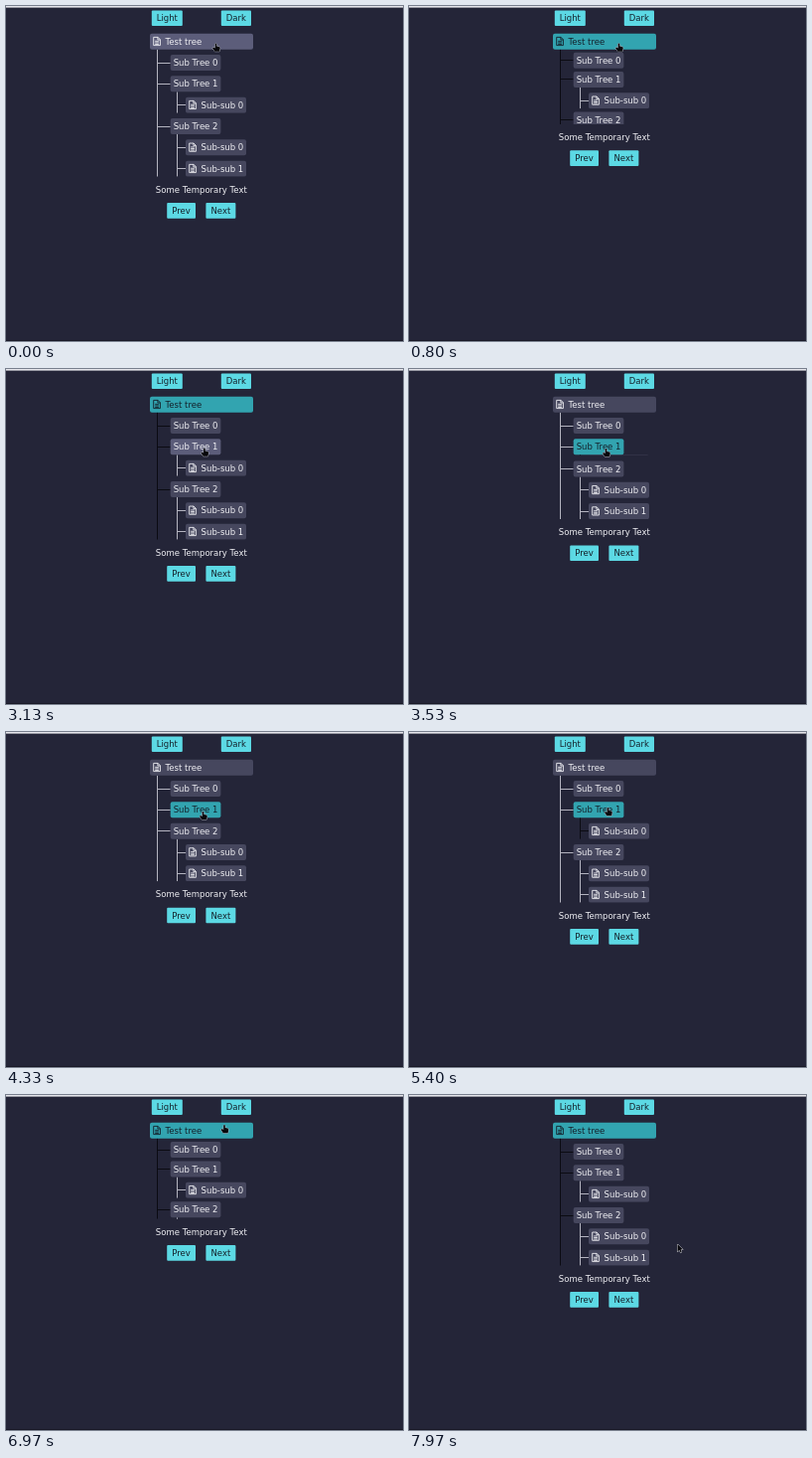
Write an HTML page with a canvas that moves like this. It is 400x337 px and loops after 8 s.

```html
<!DOCTYPE html>
<html lang="en">
<head>
<meta charset="utf-8">
<title>Collapsible tree</title>
<style>
  html, body { margin: 0; width: 100%; height: 100%; overflow: hidden; background: #242538; }
  canvas { display: block; }
</style>
</head>
<body>
<canvas id="stage" width="400" height="337"></canvas>
<script>
const ctx = document.getElementById('stage').getContext('2d');
const LOOP = 8000, SLIDE = 250;
const ROW = 16, GAP = 5.33, TOP = 27.7;
const COLOR = {
  bg: '#242538', node: '#46475e', hover: '#5c5d7a', active: '#32a4b0',
  button: '#5cd9e4', light: '#f0f0f4', dark: '#14202a', line: '#b4b4c0', activeLine: '#0b0b12'
};

const leaf = label => ({ label, icon: true, x: 181, w: 61, kids: [], toggles: [] });
const branch = (label, kids = [], toggles = []) => ({ label, x: 165.7, w: 50.7, kids, toggles });
const tree = {
  label: 'Test tree', icon: true, x: 145, w: 104, toggles: [615, 1900, 6122, 6900],
  kids: [
    branch('Sub Tree 0'),
    branch('Sub Tree 1', [leaf('Sub-sub 0')], [3284, 4450]),
    branch('Sub Tree 2', [leaf('Sub-sub 0'), leaf('Sub-sub 1')])
  ]
};
const clicks = [tree, tree.kids[1]]
  .flatMap(node => node.toggles.map(time => ({ node, time })))
  .sort((a, b) => a.time - b.time);

// time, x, y of the pointer tip
const pointerPath = [
  [0, 211.5, 37.5], [2550, 211.5, 37.5], [3050, 200, 79.5], [3500, 198.5, 80], [4300, 198.5, 80],
  [4700, 200.5, 76], [5420, 200.5, 76], [5780, 260, 60], [6080, 220, 30], [6980, 220, 30],
  [7330, 284, 112], [7650, 270.5, 150], [LOOP, 270.5, 150]
];

function pointerAt(t) {
  const i = pointerPath.findIndex(key => key[0] > t);
  const [t0, x0, y0] = pointerPath[i - 1], [t1, x1, y1] = pointerPath[i];
  const u = (t - t0) / (t1 - t0), k = u * u * (3 - 2 * u);
  return { x: x0 + (x1 - x0) * k, y: y0 + (y1 - y0) * k };
}

// 1 = open, 0 = closed; each toggle slides with a cubic ease-out of the open amount
function openness(node, t) {
  const done = node.toggles.filter(time => time <= t);
  if (!done.length) return 1;
  const u = Math.min(1, (t - done[done.length - 1]) / SLIDE);
  const amount = done.length % 2 ? 1 - u : u;
  return 1 - (1 - amount) ** 3;
}

function box(x, y, w, h, fill, radius = 2) {
  ctx.fillStyle = fill;
  ctx.beginPath();
  ctx.roundRect(x, y, w, h, radius);
  ctx.fill();
}

function text(label, x, middle, fill, align = 'left') {
  ctx.font = '8.53px "DejaVu Sans", sans-serif';
  ctx.textAlign = align;
  ctx.fillStyle = fill;
  ctx.fillText(label, x, middle + 3.1);
}

function button(label, x, middle, w) {
  box(x, middle - 7.8, w, 15.6, COLOR.button, 1);
  text(label, x + w / 2, middle, COLOR.dark, 'center');
}

function fileIcon(x, y, color) {
  ctx.strokeStyle = color;
  ctx.lineWidth = 0.9;
  ctx.stroke(new Path2D(`M${x + .5} ${y + .5}h4.4l2.3 2.4v5.8h-6.7zm4.2 0v2.6h2.5m-5.2 1.3h3.7m-3.7 1.6h3.7m-3.7 1.5h3.7`));
}

const nodeHeight = (node, t) => ROW + openness(node, t) * kidsHeight(node, t);
const kidsHeight = (node, t) => node.kids.reduce((sum, kid) => sum + GAP + nodeHeight(kid, t), 0);

function drawNode(node, y, state) {
  const { t, pointer, active } = state;
  const hovered = pointer.x >= node.x && pointer.x <= node.x + node.w && pointer.y >= y && pointer.y <= y + ROW;
  const isActive = node === active;
  const ink = isActive ? COLOR.dark : COLOR.light;
  if (hovered) state.hand = true;
  box(node.x, y, node.w, ROW, isActive ? COLOR.active : hovered ? COLOR.hover : COLOR.node);
  if (node.icon) fileIcon(node.x + 3.2, y + 3.2, ink);
  text(node.label, node.x + (node.icon ? 15.6 : 3), y + ROW / 2, ink);

  const open = openness(node, t);
  if (!node.kids.length || !open) return;
  const top = y + ROW, height = open * kidsHeight(node, t);
  const lineX = node === tree ? 152.5 : 172;
  const lineColor = isActive ? COLOR.activeLine : COLOR.line;
  ctx.save();
  ctx.beginPath();
  ctx.rect(0, top, 400, height);
  ctx.clip();
  ctx.fillStyle = lineColor;
  ctx.fillRect(Math.round(lineX - .1), top, 1, height);
  let kidY = top;
  for (const kid of node.kids) {
    kidY += GAP * open;
    ctx.fillStyle = lineColor;
    ctx.fillRect(lineX, Math.round(kidY + ROW / 2 - .5), kid.x - lineX, 1);
    drawNode(kid, kidY, state);
    kidY += nodeHeight(kid, t);
  }
  ctx.restore();
}

const ARROW = new Path2D('M0 0V7.6L1.9 6L3.1 8.6L4.3 8L3.1 5.5H5.5Z');
const HAND = new Path2D('M-.8 .6Q0 -.5 .8 .6V3L3.3 3.5Q4.3 3.8 4.2 5L3.6 8.2H-1.2L-3.3 5Q-3.2 3.8 -2 4.3L-.8 5Z');

function drawPointer({ x, y }, hand) {
  ctx.save();
  ctx.translate(x, y);
  ctx.lineWidth = 1;
  ctx.strokeStyle = hand ? '#b8bcc8' : '#d8d8de';
  ctx.fillStyle = '#08080c';
  ctx.stroke(hand ? HAND : ARROW);
  ctx.fill(hand ? HAND : ARROW);
  ctx.restore();
}

function draw(t) {
  ctx.fillStyle = COLOR.bg;
  ctx.fillRect(0, 0, 400, 337);
  ctx.fillStyle = '#e6e6ec';
  ctx.fillRect(0, 0, 400, 1.6);
  ctx.fillStyle = '#181826';
  ctx.fillRect(0, 336, 400, 1);

  button('Light', 146.8, 12.3, 31);
  button('Dark', 216.8, 12.3, 30.2);

  const lastClick = clicks.filter(click => click.time <= t).pop();
  const state = { t, pointer: pointerAt(t), active: lastClick && lastClick.node, hand: false };
  drawNode(tree, TOP, state);

  const bottom = TOP + nodeHeight(tree, t);
  text('Some Temporary Text', 196.8, bottom + 12.9, COLOR.light, 'center');
  button('Prev', 162.2, bottom + 34.2, 28.8);
  button('Next', 201.4, bottom + 34.2, 30);
  drawPointer(state.pointer, state.hand);
}

const start = performance.now();
function tick() {
  draw((performance.now() - start) % LOOP);
  requestAnimationFrame(tick);
}
tick();
</script>
</body>
</html>
```
